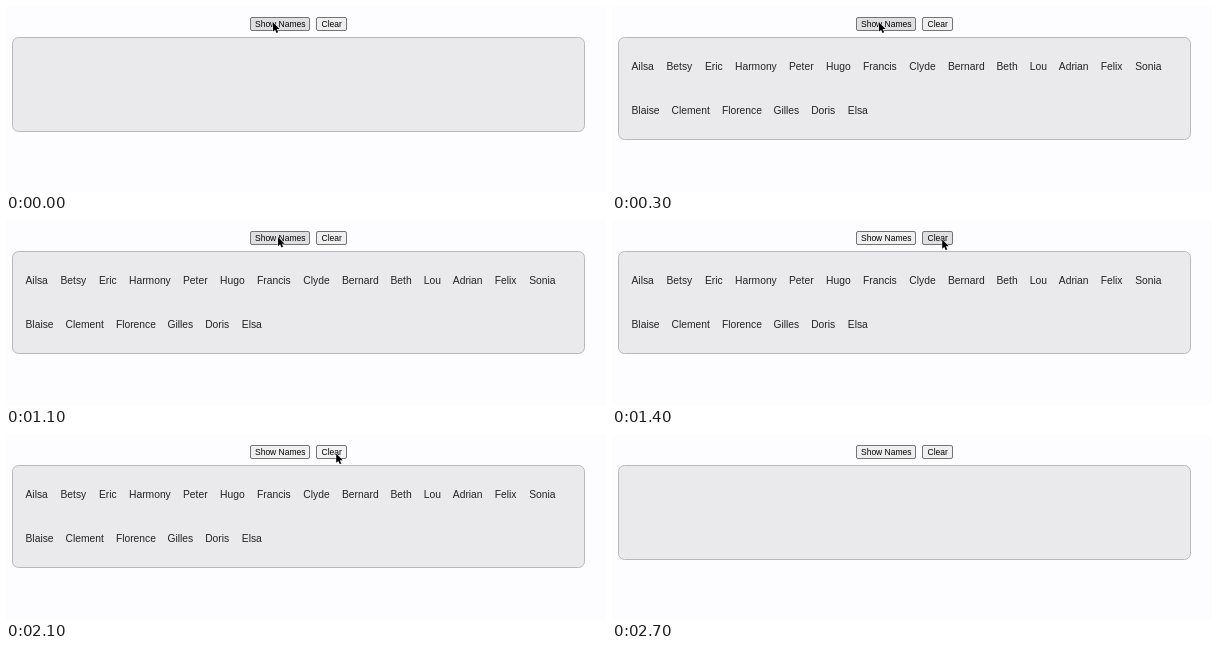
Write an HTML page that moves like this. It is 600 px wide and 186 px high and loops after 3.7 s.

```html
<!DOCTYPE html>
<html lang="en">
<head>
<meta charset="utf-8">
<title>Show names</title>
<style>
  html, body { margin: 0; width: 100%; height: 100%; overflow: hidden; background: #fdfcfe; }
  svg { display: block; width: 600px; height: 186px; }
  text { font-family: "Liberation Sans", Arial, Helvetica, sans-serif; }
  #names text { font-size: 10.3px; fill: #232323; }
  .button text { font-size: 8.5px; fill: #000; }
  .button rect { stroke: #747475; stroke-width: 1; }
  #panel { fill: #eae9eb; stroke: #b9b8ba; stroke-width: 1; }
</style>
</head>
<body>
<svg viewBox="0 0 600 186">
  <rect id="panel" x="6.5" y="31.5" width="572" height="94" rx="6"/>
  <g id="names"></g>
  <g class="button" id="show">
    <rect x="244.5" y="11.5" width="59" height="13" rx="1.5"/>
    <text x="249" y="20.7">Show Names</text>
  </g>
  <g class="button" id="clear">
    <rect x="310.5" y="11.5" width="30" height="13" rx="1.5"/>
    <text x="315.5" y="20.7">Clear</text>
  </g>
  <path id="cursor" d="M0 0V9.2L2.1 7.3L3.5 10.5L5.1 9.8L3.7 6.7H6.6Z"
        fill="#000" stroke="#fff" stroke-width=".8" stroke-linejoin="round" paint-order="stroke"/>
</svg>
<script>
const LOOP = 3700;
const $ = id => document.getElementById(id);

const rows = [
  { y: 63.9, words: [
    ["Ailsa", 19.5], ["Betsy", 54.5], ["Eric", 93], ["Harmony", 123],
    ["Peter", 177], ["Hugo", 214], ["Francis", 251], ["Clyde", 297.3],
    ["Bernard", 336], ["Beth", 384.5], ["Lou", 417.8], ["Adrian", 446.8],
    ["Felix", 488.7], ["Sonia", 523.2]
  ] },
  { y: 108.4, words: [
    ["Blaise", 19.5], ["Clement", 59.6], ["Florence", 109.9],
    ["Gilles", 161.5], ["Doris", 199.2], ["Elsa", 235.8]
  ] }
];

for (const { y, words } of rows) {
  for (const [word, x] of words) {
    const label = document.createElementNS("http://www.w3.org/2000/svg", "text");
    label.setAttribute("x", x);
    label.setAttribute("y", y);
    label.textContent = word;
    $("names").append(label);
  }
}

const fills = { idle: "#efeff0", hover: "#dfdee0", active: "#f3f3f4" };

// Each step: start time, names listed, show button, clear button, pointer tip
const steps = [
  [0,    false, "hover",  "idle",   [267, 16.4]],
  [200,  false, "active", "idle",   [267, 16.4]],
  [300,  true,  "hover",  "idle",   [267, 16.4]],
  [1100, true,  "hover",  "idle",   [272, 17]],
  [1200, true,  "hover",  "idle",   [292, 18.4]],
  [1300, true,  "idle",   "hover",  [319, 19.6]],
  [1400, true,  "idle",   "hover",  [330.2, 19.6]],
  [2100, true,  "idle",   "active", [330.2, 19.6]],
  [2200, false, "idle",   "hover",  [330.2, 19.6]],
  [2700, false, "idle",   "idle",   null]
];

function paint(time) {
  const [, listed, show, clear, tip] = steps.findLast(step => step[0] <= time);
  $("names").style.display = listed ? "" : "none";
  $("panel").setAttribute("height", listed ? 102 : 94);
  $("show").firstElementChild.setAttribute("fill", fills[show]);
  $("clear").firstElementChild.setAttribute("fill", fills[clear]);
  $("cursor").style.display = tip ? "" : "none";
  if (tip) $("cursor").setAttribute("transform", `translate(${tip})`);
}

const start = performance.now();
function tick() {
  paint((performance.now() - start) % LOOP);
  requestAnimationFrame(tick);
}
tick();
</script>
</body>
</html>
```
